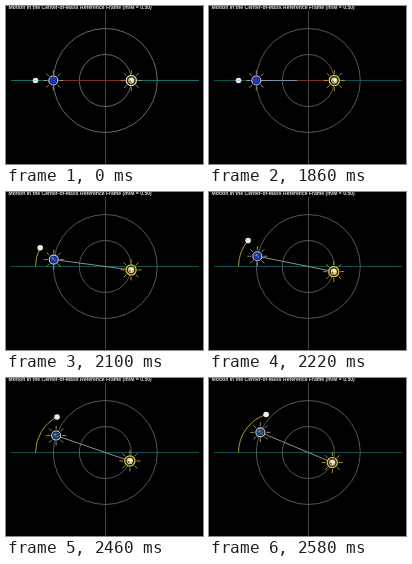
Animation of 197 by 158 pixels, one loop 2.7 s. Source, as an HTML page with a canvas:

```html
<!DOCTYPE html>
<html lang="en">
<head>
<meta charset="utf-8">
<style>
html, body { margin: 0; width: 100%; height: 100%; overflow: hidden; background: #000; }
canvas { display: block; width: 197px; height: 158px; }
</style>
</head>
<body>
<canvas id="stage"></canvas>
<script>
const W = 197, H = 158, LOOP = 2700, HOLD = 1860, STEP = 120;
const CX = 99.3, CY = 74.5, R_OUT = 52, R_IN = 26;
const TRAIL = { x: 69.5, y: 74.5, r: 40 };
const REST = { axis: '#087070', upright: '#464646', circle: '#747474', ray: '#b09050', rim: '#e8dcc0' };
const MOVE = { axis: '#0a5252', upright: '#404444', circle: '#606060', ray: '#b8a038', rim: '#d8cc30' };
const RAD = Math.PI / 180, TAU = Math.PI * 2;

const canvas = document.getElementById('stage');
const dpr = window.devicePixelRatio || 1;
canvas.width = W * dpr;
canvas.height = H * dpr;
const ctx = canvas.getContext('2d');
ctx.scale(dpr, dpr);

function line(x1, y1, x2, y2, color, width = 1) {
  ctx.strokeStyle = color;
  ctx.lineWidth = width;
  ctx.beginPath();
  ctx.moveTo(x1, y1);
  ctx.lineTo(x2, y2);
  ctx.stroke();
}

function arc(x, y, r, color, width = 0.9, from = 0, to = TAU) {
  ctx.strokeStyle = color;
  ctx.lineWidth = width;
  ctx.beginPath();
  ctx.arc(x, y, r, from, to);
  ctx.stroke();
}

function disc(x, y, r, color) {
  ctx.fillStyle = color;
  ctx.beginPath();
  ctx.arc(x, y, r, 0, TAU);
  ctx.fill();
}

function rays(x, y, from, to, color) {
  for (let i = 0; i < 8; i++) {
    const c = Math.cos(i * TAU / 8), s = Math.sin(i * TAU / 8);
    line(x + c * from, y + s * from, x + c * to, y + s * to, color, 0.9);
  }
}

// Point on a circle, measured clockwise from its left end
function orbit(x, y, r, deg) {
  return [x - r * Math.cos(deg * RAD), y - r * Math.sin(deg * RAD)];
}

function drawBackdrop(tone) {
  ctx.fillStyle = '#000';
  ctx.fillRect(0, 0, W, H);
  ctx.fillStyle = '#e4e4e4';
  ctx.font = 'bold 5.08px "Liberation Sans", Arial, sans-serif';
  ctx.fillText('Motion in the Center-of-Mass Reference Frame (m/M = 0.50)', 2.6, 3.1);
  line(99.5, 5, 99.5, H, tone.upright);
  line(5, 74.5, 193, 74.5, tone.axis);
  arc(CX, CY, R_OUT, tone.circle);
  arc(CX, CY, R_IN, tone.circle);
}

function drawLink(a, b, moving, k) {
  if (k > 0) {
    line(...a, ...b, '#908e8a');
    return;
  }
  line(...a, ...b, '#7c2c20');
  if (moving) line(a[0], a[1], 88, a[1], '#7c90a0');
}

function drawSmallStar([x, y], k) {
  rays(x, y, 6, 10, '#a89c80');
  disc(x, y, 4.6, '#0c1850');
  disc(x, y, 3.3, k > 4 ? '#284c68' : '#1c38b8');
  if (k > 0) {
    disc(x - 1, y - 1, 1.1, '#7088b0');
    disc(x + 1.2, y + 0.8, 0.8, '#5070a0');
  }
  arc(x, y, 4.5, '#c8ccd8', 1.1);
}

function drawLargeStar([x, y], tone) {
  rays(x, y, 6.5, 10.5, tone.ray);
  disc(x, y, 5, '#2c2810');
  disc(x, y, 3.1, '#d0c8a8');
  disc(x + 0.5, y - 0.7, 1.7, '#f4f0e4');
  disc(x - 1.2, y + 1, 0.9, '#706028');
  arc(x, y, 5.1, tone.rim, 1.2);
}

function draw(t) {
  const moving = t >= HOLD;
  const tone = moving ? MOVE : REST;
  const k = moving ? Math.floor((t - HOLD) / STEP) : 0;
  const spin = 3.8 * k;
  const sweep = 15 * k - 0.5 * k * k;
  const small = orbit(CX, CY, R_OUT, spin);
  const large = orbit(CX, CY, R_IN, spin + 180);
  const probe = orbit(TRAIL.x, TRAIL.y, TRAIL.r, sweep);

  drawBackdrop(tone);
  drawLink(small, large, moving, k);
  if (k > 0) arc(TRAIL.x, TRAIL.y, TRAIL.r, '#a89a28', 1, Math.PI, Math.PI + sweep * RAD);
  drawSmallStar(small, k);
  drawLargeStar(large, tone);
  disc(...probe, 2.8, '#ececec');
  if (k === 0) line(probe[0] - 2, probe[1], probe[0] + 2, probe[1], '#b0b8b8', 0.7);
}

const start = performance.now();
function tick() {
  draw((performance.now() - start) % LOOP);
  requestAnimationFrame(tick);
}
tick();
</script>
</body>
</html>
```
